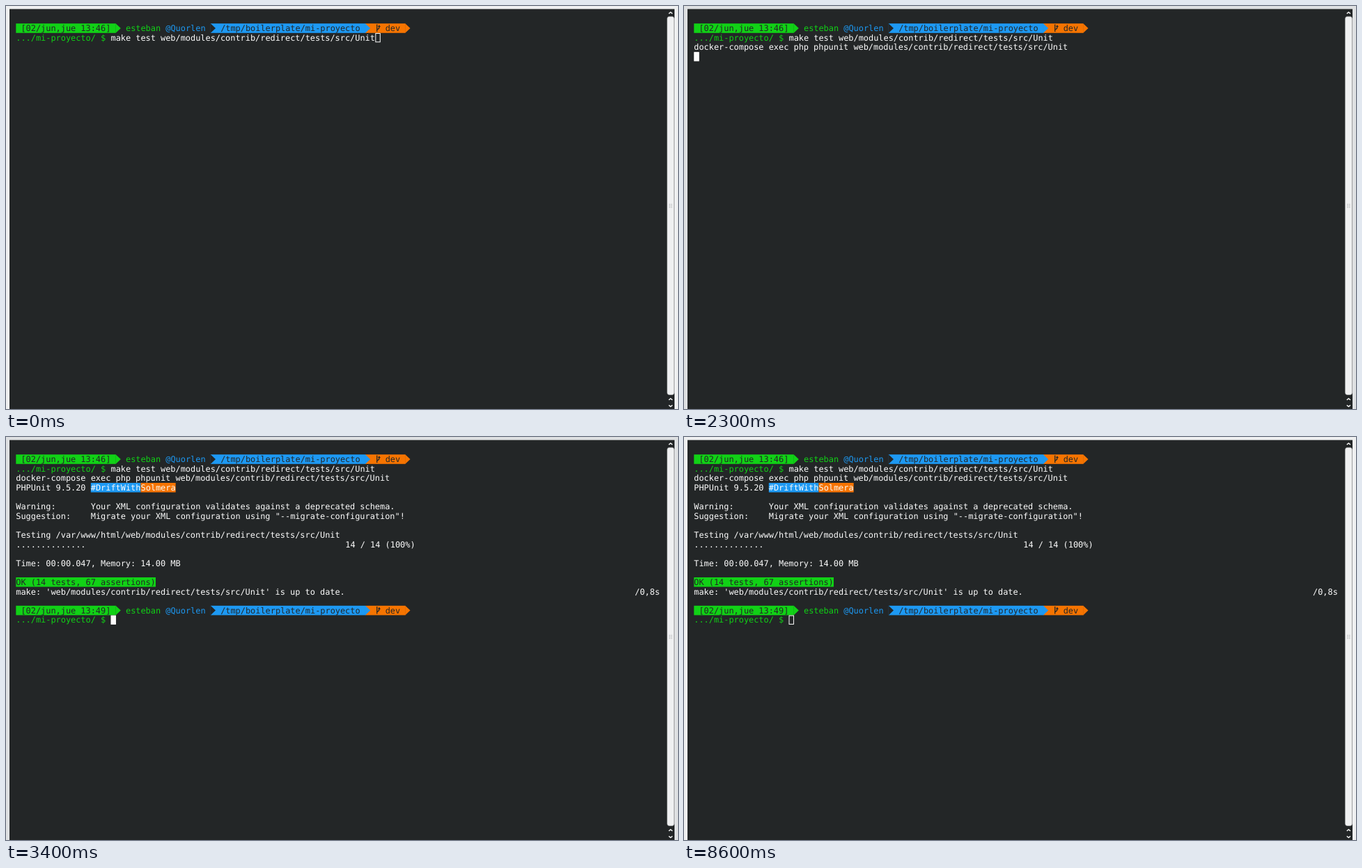
Recreate the animation shown at these times as an HTML page. Size 965 by 580 pixels, loop 8.7 s.

```html
<!DOCTYPE html>
<html lang="es">
<head>
<meta charset="utf-8">
<title>Terminal</title>
<style>
html, body { margin: 0; width: 100%; height: 100%; overflow: hidden; background: #eff0f1; }
svg { display: block; width: 965px; height: 580px; }
text {
  font-family: "DejaVu Sans Mono", monospace;
  font-size: 11.905px;
  white-space: pre;
  text-rendering: geometricPrecision;
}
</style>
</head>
<body>
<svg id="stage" viewBox="0 0 965 580"></svg>
<script>
const NS = "http://www.w3.org/2000/svg";
const LOOP = 8700, STEP = 100;
const CW = 7.167, RH = 13.6, X0 = 14.3, Y0 = 25.2, ASCENT = 10.9;
const BG = "#232627", FG = "#fcfcfc", GREEN = "#11d116", BLUE = "#1d99f3", ORANGE = "#f67400";
const stage = document.getElementById("stage");

const colX = c => X0 + c * CW;
const rowY = r => Y0 + r * RH;

function add(parent, tag, attrs) {
  const el = document.createElementNS(NS, tag);
  for (const k in attrs) el.setAttribute(k, attrs[k]);
  parent.appendChild(el);
  return el;
}

function write(parent, row, col, str, fill = FG) {
  add(parent, "text", { x: colX(col), y: rowY(row) + ASCENT, fill }).textContent = str;
}

function band(parent, row, col, cols, fill) {
  add(parent, "rect", { x: colX(col), y: rowY(row), width: cols * CW, height: RH, fill });
}

// Right-pointing separator filling one cell
function arrow(parent, row, col, fill) {
  const x = colX(col), y = rowY(row);
  add(parent, "path", { d: `M${x - .2} ${y}h.2l${CW} ${RH / 2}l${-CW} ${RH / 2}h-.2z`, fill });
}

function branch(parent, row, col) {
  const x = colX(col), y = rowY(row);
  add(parent, "path", {
    d: `M${x + 2.4} ${y + 1.3}v10.4M${x + 2.4} ${y + 8.8}q3.2 -1 3.2 -3.6v-1.2`,
    fill: "none", stroke: BG, "stroke-width": 1.3
  });
  add(parent, "path", { d: `M${x + 3.6} ${y + 4.9}l2 -2.9l2 2.9z`, fill: BG });
}

function prompt(parent, row, clock) {
  band(parent, row, 0, 20, GREEN);
  arrow(parent, row, 20, GREEN);
  write(parent, row, 1, `[02/jun,jue ${clock}]`, BG);
  write(parent, row, 22, "esteban", GREEN);
  write(parent, row, 30, "@Quorlen", BLUE);
  band(parent, row, 39, 31, BLUE);
  arrow(parent, row, 39, BG);
  write(parent, row, 41, "/tmp/boilerplate/mi-proyecto", BG);
  band(parent, row, 70, 8, ORANGE);
  arrow(parent, row, 70, BLUE);
  branch(parent, row, 72);
  write(parent, row, 74, "dev", BG);
  arrow(parent, row, 78, ORANGE);
  write(parent, row + 1, 0, ".../mi-proyecto/ $", GREEN);
}

function chevron(y, dir) {
  add(stage, "path", {
    d: `M951.8 ${y + dir}l2.6 ${-2 * dir}l2.6 ${2 * dir}`,
    fill: "none", stroke: FG, "stroke-width": 1.5
  });
}

const frame = add(stage, "rect", { width: 965, height: 580 });
add(stage, "rect", { x: 5, y: 4.4, width: 955, height: 576, fill: BG });

add(stage, "rect", {
  x: 949.6, y: 15.3, width: 9.8, height: 544.2, rx: 3,
  fill: "#eff0f1", stroke: "#c3c5c6", "stroke-width": .6
});
for (let i = 0; i < 3; i++) {
  add(stage, "path", {
    d: `M952.3 ${285.4 + i * 2.2}h1.6m1 0h1.6`, stroke: "#a9abad", "stroke-width": .9
  });
}
chevron(10, 1);
chevron(566, 1);
chevron(575.5, -1);

// Screen content, grouped by the moment it is printed
const path = "web/modules/contrib/redirect/tests/src/Unit";
const blocks = [];
function block(start, draw) {
  const g = add(stage, "g", {});
  draw(g);
  blocks.push({ start, g });
}

block(0, g => {
  prompt(g, 0, "13:46");
  write(g, 1, 19, "make test " + path);
});
block(2300, g => write(g, 2, 0, "docker-compose exec php phpunit " + path));
block(3000, g => {
  write(g, 3, 0, "PHPUnit 9.5.20");
  band(g, 3, 15, 10, BLUE);
  band(g, 3, 25, 7, ORANGE);
  write(g, 3, 15, "#DriftWith");
  write(g, 3, 25, "Solmera");
  write(g, 5, 0, "Warning:");
  write(g, 5, 15, "Your XML configuration validates against a deprecated schema.");
  write(g, 6, 0, "Suggestion:");
  write(g, 6, 15, 'Migrate your XML configuration using "--migrate-configuration"!');
  write(g, 8, 0, "Testing /var/www/html/" + path);
  write(g, 9, 0, ".".repeat(14));
  write(g, 9, 66, "14 / 14 (100%)");
  write(g, 11, 0, "Time: 00:00.047, Memory: 14.00 MB");
  band(g, 13, 0, 28, GREEN);
  write(g, 13, 0, "OK (14 tests, 67 assertions)", BG);
});
block(3100, g => {
  write(g, 14, 0, `make: '${path}' is up to date.`);
  write(g, 14, 124, "/0,8s");
});
block(3200, g => prompt(g, 16, "13:49"));

const cursor = add(stage, "rect", { stroke: FG, "stroke-width": 1 });
const cursorStops = [[0, 1, 72], [2300, 3, 0], [3000, 14, 0], [3100, 15, 0], [3200, 17, 19]];

const pointer = add(stage, "g", {});
for (const [y, fill] of [[56, "#16a51c"], [72.5, "#a3b044"]]) {
  add(pointer, "circle", { cx: 729.8, cy: y, r: 2.3, fill, stroke: "#101211", "stroke-width": 1 });
}

const clamp = v => Math.max(0, Math.min(1, v));
const mix = (a, b, k) => a.map((v, i) => Math.round(v + (b[i] - v) * k));

function render(now) {
  const t = Math.floor(now % LOOP / STEP) * STEP;

  // The window frame darkens while the window has focus
  const focus = clamp(t / 200) * clamp((8600 - t) / 200);
  frame.setAttribute("fill", `rgb(${mix([239, 240, 241], [222, 224, 226], focus)})`);

  for (const b of blocks) b.g.style.display = t >= b.start ? "" : "none";

  const [, row, col] = cursorStops.filter(s => t >= s[0]).pop();
  const solid = t >= 100 && t < 8500;
  cursor.setAttribute("x", colX(col) + .5);
  cursor.setAttribute("y", rowY(row) + .7);
  cursor.setAttribute("width", CW - .7);
  cursor.setAttribute("height", RH - 1.3);
  cursor.setAttribute("fill", solid ? FG : "none");

  pointer.style.display = t >= 100 && t < 2300 ? "" : "none";
}

const t0 = performance.now();
function tick() {
  render(performance.now() - t0);
  requestAnimationFrame(tick);
}
render(0);
requestAnimationFrame(tick);
</script>
</body>
</html>
```
